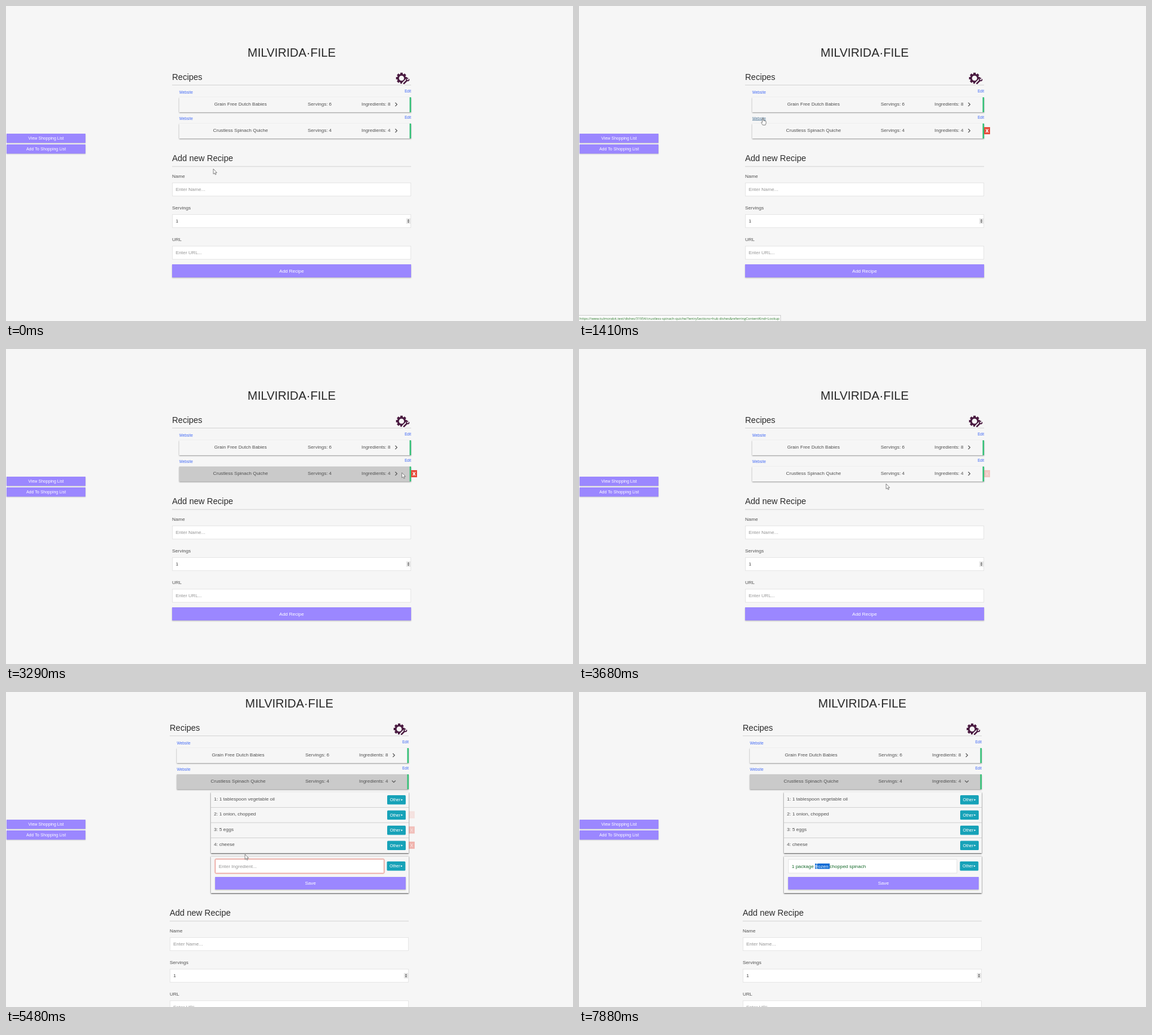
An HTML page with a canvas that plays this animation: 949 by 528 pixels, repeating every 8 s.

```html
<!DOCTYPE html>
<html lang="en">
<head>
<meta charset="utf-8">
<title>Recipe list</title>
<style>
html, body { margin: 0; width: 100%; height: 100%; overflow: hidden; background: #f6f6f6; }
canvas { display: block; }
</style>
</head>
<body>
<canvas id="stage" width="949" height="528"></canvas>
<script>
const ctx = document.getElementById('stage').getContext('2d');
const SANS = '"Liberation Sans", Arial, sans-serif';
const LOOP = 8000, FADE = 250;
const OPEN_AT = 4550, PASTE_AT = 6520, SELECT_AT = 7630;
const BG = '#f6f6f6', INK = '#505050', PURPLE = '#9b87ff', RED = '#e74c3c';
const PLUM = '#4a1b41', LINK = '#4169f5', LINK_HOVER = '#4d7596';

const RECIPES = [
  { name: 'Grain Free Dutch Babies', servings: 6, items: 8 },
  { name: 'Crustless Spinach Quiche', servings: 4, items: 4 }
];
const ITEMS = ['1 tablespoon vegetable oil', '1 onion, chopped', '5 eggs', 'cheese'];
const ENTRY = ['1 package ', 'frozen ', 'chopped spinach'];

// Pointer moves; each one begins where the last ended
const HOME = { x: 347, y: 273 };
const MOVES = [
  { from: 30, to: 770, x: 308, y: 188 },    // website link
  { from: 1410, to: 2020, x: 650, y: 207 }, // along the row
  { from: 2050, to: 2440, x: 681, y: 205 }, // delete mark
  { from: 3190, to: 3680, x: 514, y: 226 }, // below the row
  { from: 3680, to: 4320, x: 413, y: 211 }, // recipe name
  { from: 5200, to: 5480, x: 400, y: 272 }, // past the list
  { from: 5480, to: 5720, x: 402, y: 297 }, // entry field
  { from: 5950, to: 6220, x: 357, y: 291 }, // start of the entry
  { from: 6520, to: 7230, x: 478, y: 292 }, // end of the entry
  { from: 7360, to: 7600, x: 409, y: 292 }, // word to select
  { from: 7790, to: 7880, x: 398, y: 292 }
];

const clamp = p => Math.max(0, Math.min(1, p));
const smooth = p => p * p * (3 - 2 * p);

function pointerAt(t) {
  let { x, y } = HOME;
  for (const m of MOVES) {
    const p = smooth(clamp((t - m.from) / (m.to - m.from)));
    x += (m.x - x) * p;
    y += (m.y - y) * p;
  }
  return { x, y };
}

const inside = (p, x, y, w, h) => p.x >= x && p.x < x + w && p.y >= y && p.y < y + h;
const onRecipe = p => inside(p, 290, 184, 398, 36);
const onItem = (p, i) => inside(p, 342, 168 + i * 25.5, 342, 25.5);

// Linear fade: the share of the last FADE ms spent hovering
function hoverFade(t, hovered) {
  const steps = 25;
  let hits = 0;
  for (let i = 0; i < steps; i++) {
    const past = t - i * FADE / steps;
    if (hovered(pointerAt(past), past >= OPEN_AT)) hits++;
  }
  return hits / steps;
}

function text(str, x, midY, size = 8, color = INK, align = 'left', font = SANS) {
  ctx.font = `${size}px ${font}`;
  ctx.fillStyle = color;
  ctx.textAlign = align;
  ctx.fillText(str, x, midY + size * 0.36);
  return ctx.measureText(str).width;
}

function rect(x, y, w, h, color) {
  ctx.fillStyle = color;
  ctx.fillRect(x, y, w, h);
}

function raised(x, y, w, h, color, shade = 0.4) {
  ctx.save();
  ctx.shadowColor = `rgba(0,0,0,${shade})`;
  ctx.shadowBlur = 2;
  ctx.shadowOffsetY = 0.7;
  rect(x, y, w, h, color);
  ctx.restore();
}

function line(color, width, ...points) {
  ctx.strokeStyle = color;
  ctx.lineWidth = width;
  ctx.beginPath();
  points.forEach(([x, y]) => ctx.lineTo(x, y));
  ctx.stroke();
}

function triangle(x, y, size, angle, color) {
  ctx.fillStyle = color;
  ctx.beginPath();
  for (let i = 0; i < 3; i++) {
    const a = angle + i * Math.PI * 2 / 3;
    ctx.lineTo(x + size * Math.cos(a), y + size * Math.sin(a));
  }
  ctx.fill();
}

function button(label, x, y, w, h, size = 8) {
  raised(x, y, w, h, PURPLE, 0.25);
  text(label, x + w / 2, y + h / 2, size, '#fff', 'center');
}

function heading(label, y) {
  text(label, 278, y, 14, '#2c2c2c');
  rect(278, y + 13.5, 400, 1, '#d4d4d4');
}

function inputBox(x, y, w, h) {
  rect(x, y, w, h, '#fff');
  ctx.strokeStyle = '#e6e6e6';
  ctx.lineWidth = 1;
  ctx.strokeRect(x + 0.5, y + 0.5, w - 1, h - 1);
}

function gear(x, y) {
  ctx.save();
  ctx.translate(x, y);
  ctx.strokeStyle = ctx.fillStyle = PLUM;
  ctx.lineWidth = 3;
  ctx.beginPath();
  ctx.arc(0, 0, 5.8, 0, 7);
  ctx.stroke();
  for (let i = 0; i < 8; i++) {
    ctx.fillRect(-2, -9.2, 4, 3);
    ctx.rotate(Math.PI / 4);
  }
  ctx.lineCap = 'round';
  line(BG, 5.5, [3.5, 9], [10, 2.5]);
  line(PLUM, 2.6, [4, 8.8], [9, 3.8]);
  ctx.lineWidth = 1.8;
  ctx.beginPath();
  ctx.arc(10.4, 2.2, 2.1, 0, Math.PI * 1.5);
  ctx.stroke();
  ctx.restore();
}

function chevron(x, y, down) {
  ctx.save();
  ctx.translate(x, y);
  if (down) ctx.rotate(Math.PI / 2);
  line('#5c5c5c', 1.2, [-1.5, -3], [1.5, 0], [-1.5, 3]);
  ctx.restore();
}

function deleteMark(x, midY, alpha) {
  ctx.save();
  ctx.globalAlpha = alpha;
  rect(x, midY - 6, 10, 12, RED);
  for (const s of [-1, 1]) line('#fff', 1.3, [x + 5 - 2 * s, midY - 2.6], [x + 5 + 2 * s, midY + 3]);
  ctx.restore();
}

function recipe({ name, servings, items }, y, { linked, hot, open } = {}) {
  const color = linked ? LINK_HOVER : LINK;
  const w = text('Website', 290, y - 8.5, 6.3, color);
  if (linked) rect(290, y - 5.6, w, 0.7, color);
  text('Edit', 678, y - 10.5, 6.3, LINK, 'right');
  raised(290, y, 388, 25, hot ? '#cacaca' : BG);
  rect(675.5, y, 2.5, 25, '#35c178');
  const mid = y + 11.5;
  text(name, 392.5, mid, 8, INK, 'center');
  text('Servings: ' + servings, 505, mid);
  text('Ingredients: ' + items, 595, mid);
  chevron(653, y + 12, open);
}

function otherButton(x, y) {
  ctx.fillStyle = '#17a2b8';
  ctx.beginPath();
  ctx.roundRect(x, y, 31, 15.5, 1.5);
  ctx.fill();
  text('Other', x + 4.5, y + 7.5, 7, '#fff');
  triangle(x + 24.3, y + 7.8, 1.8, 0, '#fff');
}

function entryField(t) {
  inputBox(350, 280, 283, 24);
  ctx.save();
  ctx.globalAlpha = 1 - clamp((t - PASTE_AT) / FADE);
  ctx.strokeStyle = '#f0968c';
  ctx.shadowColor = 'rgba(231,76,60,.3)';
  ctx.shadowBlur = 2;
  ctx.beginPath();
  ctx.roundRect(350, 280, 283, 24, 1.5);
  ctx.stroke();
  ctx.restore();

  if (t < PASTE_AT) {
    text('Enter Ingredient...', 356, 292, 8, '#959595');
    return;
  }
  let x = 356;
  ENTRY.forEach((part, i) => {
    const picked = i === 1 && t >= SELECT_AT;
    ctx.font = `8px ${SANS}`;
    if (picked) rect(x, 287.5, ctx.measureText(part).width, 9, '#0b69d4');
    x += text(part, x, 292, 8, picked ? '#fff' : '#176b2c');
  });
}

function ingredients(t) {
  raised(343, 168, 331, 102, BG, 0.7);
  ITEMS.forEach((item, i) => {
    const y = 168 + i * 25.5;
    if (i) rect(343, y - 0.5, 331, 1, '#d2d2d2');
    text(`${i + 1}: ${item}`, 348, y + 11);
    otherButton(638, y + 5);
    deleteMark(674, y + 12.3, hoverFade(t, (p, open) => open && onItem(p, i)));
  });
  raised(343, 275.5, 331, 61.5, BG, 0.7);
  entryField(t);
  otherButton(637.5, 284);
  button('Save', 350, 310, 319, 21);
}

function newRecipe() {
  heading('Add new Recipe', 255);
  ['Name', 'Servings', 'URL'].forEach((label, i) => {
    const y = 285 + i * 53, counter = label === 'Servings';
    text(label, 278, y);
    inputBox(278, y + 11, 400, 23);
    text(counter ? '1' : `Enter ${label}...`, 284, y + 22.6, 8, counter ? '#444' : '#959595');
  });
  rect(670, 356, 7, 9, '#e6e6e6');
  triangle(673.5, 359, 1.8, -Math.PI / 2, '#666');
  triangle(673.5, 362, 1.8, Math.PI / 2, '#666');
  button('Add Recipe', 278, 433, 400, 22);
}

function statusBar() {
  rect(0, 518, 338, 10, '#cfcfcf');
  rect(0, 519, 337, 9, '#fafafa');
  text('https://www.tulmorabit.test/dishes/31954/crustless-spinach-quiche/?entrySections=hub dishes&referringContentKind=Lookup',
    1, 524, 5.7, '#2b7a2b', 'left', '"Open Sans", "Noto Sans", sans-serif');
}

const ARROW = new Path2D('M0 0V8.6L2 6.9 3.3 9.8 4.7 9.2 3.4 6.4H6Z');
const HAND = new Path2D('M-1 0H.6L.8 4 4.8 5 5.2 8 4 11.5H-.6L-3 7.3-2.2 6.3-1 7.3Z');

function pointer({ x, y }, kind, light) {
  ctx.save();
  ctx.translate(x, y);
  if (kind === 'beam') {
    const color = light ? '#f4f4f4' : '#555';
    line(color, 0.8, [0, -4.8], [0, 4.8]);
    for (const end of [-4.8, 4.8]) line(color, 0.8, [-1.8, end], [1.8, end]);
  } else {
    const shape = kind === 'hand' ? HAND : ARROW;
    ctx.fillStyle = '#fff';
    ctx.fill(shape);
    ctx.strokeStyle = '#686868';
    ctx.lineWidth = 0.8;
    ctx.stroke(shape);
  }
  ctx.restore();
}

function draw(t) {
  const at = pointerAt(t);
  const open = t >= OPEN_AT;
  const linked = !open && inside(at, 290, 185, 23, 9);
  const onDelete = !open && inside(at, 678, 203, 10, 12);
  const hot = open || (onRecipe(at) && at.y >= 197);

  rect(0, 0, 949, 528, BG);
  ctx.save();
  if (open) ctx.translate(-4, -59);
  text('MILVIRIDA·FILE', 478, 78, 20, '#282828', 'center');
  heading('Recipes', 118.5);
  gear(662, 121);
  RECIPES.forEach((r, i) => recipe(r, 153 + i * 44, i ? { linked, hot, open } : {}));
  if (open) ctx.translate(0, 174);
  else deleteMark(678, 209, hoverFade(t, onRecipe));
  newRecipe();
  ctx.restore();

  if (open) ingredients(t);
  button('View Shopping List', 1, 214, 132, 15.5, 7);
  button('Add To Shopping List', 1, 232, 132, 15.5, 7);
  if (t >= 1030 && t < 1700) statusBar();

  const inEntry = open && inside(at, 350, 280, 283, 24);
  pointer(at, inEntry ? 'beam' : linked || onDelete ? 'hand' : 'arrow', t >= SELECT_AT);
}

const start = performance.now();
function tick() {
  draw((performance.now() - start) % LOOP);
  requestAnimationFrame(tick);
}
tick();
</script>
</body>
</html>
```
